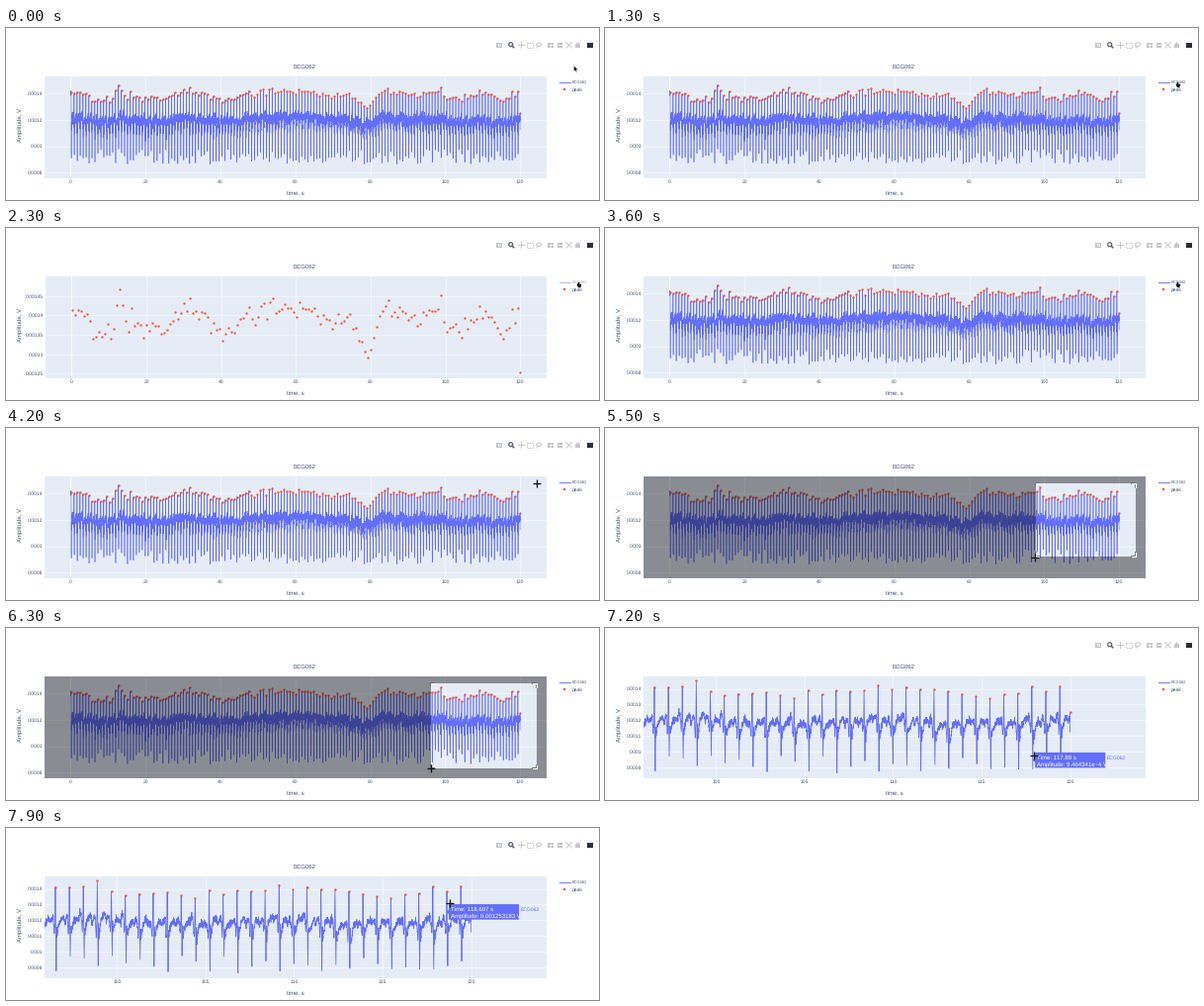
These frames come from a looping animation (600x174 px, 8000 ms). A matplotlib script:

```python
import numpy as np
import matplotlib.pyplot as plt
from matplotlib.animation import FuncAnimation
from matplotlib.patches import Circle, Ellipse, PathPatch, Polygon, Rectangle
from matplotlib.path import Path

W, H, DPI = 600, 174, 100
FPS, FRAMES = 10, 80
PT = 72 / DPI  # points per pixel
BLUE, RED, INK = "#636efa", "#ef553b", "#3f526f"
PAPER, GREY, DARK = "#e5ecf6", "#c4c6c9", "#5d6672"
TOP, BOTTOM, RIGHT = 49, 152, 547

plt.rcParams["font.family"] = "Liberation Sans"
plt.rcParams["text.hinting"] = "none"
plt.rcParams["text.hinting_factor"] = 1

# Moments of the session, in seconds
HIDE, SHOW, DRAG, RELEASE, HOVER = 1.7, 3.5, 4.5, 6.5, 6.7

# Views: left edge, x limits, y limits, x ticks, y ticks (microvolts), line width
FULL = (39, (-6.97, 127.1), (755, 1532), range(0, 121, 20), range(800, 1401, 200), 0.6)
PEAKS = (40, (-7.0, 127.1), (1238.4, 1500.5), range(0, 121, 20), range(1250, 1451, 50), 0.6)
ZOOM = (39, (95.9, 124.27), (831, 1479), range(100, 121, 5), range(900, 1401, 100), 0.8)

# Trend of the peak heights: time, microvolts
TREND = np.array([
    (0, 1430), (4, 1410), (6, 1365), (11, 1355), (12.8, 1475), (14.5, 1370),
    (25, 1365), (31, 1415), (44, 1350), (48, 1410), (64, 1430), (68, 1375),
    (75, 1385), (79, 1285), (83, 1420), (92, 1390), (96.5, 1415), (99, 1440),
    (100, 1355), (110, 1395), (115.5, 1340), (119.4, 1415),
])


def make_signal():
    """Return time and voltage of the trace, then time and height of the peaks."""
    rng = np.random.default_rng(62)
    step = 0.004
    beat = np.round(np.arange(0.13, 119.5, 0.79) / step) * step
    trend = np.interp(beat, *TREND.T)
    height = trend + rng.normal(0, 16, len(beat))

    # Offsets from the beat and the level there; the first is the spike downwards
    offset = np.array([0.05, 0.075, 0.1, 0.16, 0.25, 0.4, 0.5, 0.6, 0.68, 0.73, 0.766])
    level = np.array([0, 1165, 1100, 1150, 1190, 1215, 1185, 1218, 1205, 1110, 1190])
    smooth = np.convolve(np.pad(trend, 2, mode="edge"), np.ones(5) / 5, "valid")
    wander = 0.45 * (smooth - 1385) + rng.normal(0, 9, len(beat))
    body = level + wander[:, None] + rng.normal(0, 11, (len(beat), len(level)))
    body[:, 0] = rng.uniform(840, 960, len(beat))

    knots_t = np.concatenate([beat, (beat[:, None] + offset).ravel()])
    knots_v = np.concatenate([height, body.ravel()])
    order = np.argsort(knots_t)
    t = np.arange(0, 120 + step / 2, step)
    v = np.interp(t, knots_t[order], knots_v[order])

    noise = np.convolve(rng.normal(0, 12, len(t)), np.ones(4) / 2, "same")
    phase = (t - beat[0]) % 0.79
    v += np.where((phase > 0.08) & (phase < 0.76), noise, 0)
    v[-3:] = 1253, 1190, 1125
    return t, v, np.append(beat, 120), np.append(height, 1253)


fig = plt.figure(figsize=(W / DPI, H / DPI), dpi=DPI, facecolor="white")
plot = fig.add_axes([0, 0, 1, 1], facecolor=PAPER)
for spine in plot.spines.values():
    spine.set_visible(False)
plot.tick_params(length=0, pad=1.3, labelsize=5.1 * PT, labelcolor=INK)
plot.grid(color="white", lw=0.5 * PT)
plot.set_axisbelow(True)
plot.axvline(0, color="white", lw=0.9 * PT, zorder=1)

time, volt, peak_t, peak_v = make_signal()
trace, = plot.plot(time, volt, color=BLUE)
plot.plot(peak_t, peak_v, "o", color=RED, ms=2.3 * PT, mew=0)

# Overlay in pixels, origin at the top left
top = fig.add_axes([0, 0, 1, 1], zorder=5)
top.set(xlim=(0, W), ylim=(H, 0))
top.axis("off")


def label(x, y, text, size, color=INK, **kw):
    kw = {"ha": "left", "va": "center_baseline", **kw}
    return top.text(x, y, text, fontsize=size * PT, color=color, **kw)


def stroke(xs, ys, color=GREY, width=1.0, **kw):
    return top.plot(xs, ys, color=color, lw=width * PT, **kw)[0]


def fill(shape, color=GREY, **kw):
    shape.set(facecolor=color, edgecolor="none", **kw)
    return top.add_patch(shape)


def ring(shape, color=GREY, width=1.0):
    shape.set(facecolor="none", edgecolor=color, linewidth=width * PT)
    return top.add_patch(shape)


def make_modebar():
    y = 17.3
    parts = [
        fill(Rectangle((496.3, 15.4), 6, 4.4)),
        fill(Rectangle((498, 14.6), 2.6, 1)),
        fill(Circle((499.3, 17.6), 1.5), "white"),
        fill(Circle((499.3, 17.6), 0.8)),
        ring(Circle((510.7, 16.7), 2), DARK, 1.3),
        stroke([512.2, 513.8], [18.2, 19.8], DARK, 1.5),
        stroke([517.6, 523.6], [y, y]),
        stroke([520.6, 520.6], [y - 3, y + 3]),
        stroke([527.3, 532.7, 532.7, 527.3, 527.3],
               [14.7, 14.7, 20, 20, 14.7], width=0.9, ls=(0, (1.6, 0.8))),
        ring(Ellipse((539.2, 16.6), 5.6, 3.6, angle=-15), width=0.9),
        stroke([537.3, 537.8], [18, 20.2], width=0.9),
    ]
    for x in (551, 560.3):
        parts.append(fill(Rectangle((x - 2.8, y - 2.8), 5.6, 5.6)))
        parts.append(stroke([x - 1.7, x + 1.7], [y, y], "white", 0.7))
    parts += [
        stroke([551, 551], [y - 1.7, y + 1.7], "white", 0.7),
        stroke([566.8, 572.2], [14.6, 20]),
        stroke([566.8, 572.2], [20, 14.6]),
        fill(Polygon([(575.2, 17.4), (578.4, 14.4), (581.6, 17.4)])),
        fill(Rectangle((576.2, 17.2), 4.4, 2.8)),
        fill(Rectangle((588.2, 14.6), 5.6, 5.6), "#2b2f36"),
    ]
    return parts


modebar = make_modebar()

# Title, axis names, legend
label(302, 38.8, "ECG062", 6.4, ha="center")
x_name = label(292.5, 166.8, "time, s", 5.9, ha="center")
label(14.2, 98, "Amplitude, V", 6.2, rotation=90, ha="center", va="center")
legend = [stroke([559.5, 570.5], [54.7, 54.7], BLUE, 0.9),
          label(573, 54.9, "ECG062", 4.4)]
fill(Circle((565, 62), 1.2), RED)
label(573, 62.1, "peak", 4.8)

# Zoom rectangle: shade around it and four corner brackets
shade = top.add_patch(PathPatch(Path([(0, 0)]), facecolor="black", lw=0))
bracket_edge = stroke([], [], "#666666", 1.7)
bracket = stroke([], [], "white", 1.1)

# Hover label
bubble = fill(Polygon([(0, 0)]), BLUE)
hover_lines = [label(0, 0, "", 5.6, "white") for _ in range(2)]
hover_name = label(0, 0, "ECG062", 5.2, BLUE)
hover_parts = [bubble, hover_name, *hover_lines]

# Pointers
ARROW = np.array([(0, 0), (0, 6), (1.4, 4.8), (2.4, 6.8), (3.4, 6.3), (2.4, 4.3), (4.2, 4.2)])
HAND = np.array([(-0.6, 0), (0.5, 0), (0.7, 2.1), (2.6, 2.6), (1.8, 6.2), (-0.7, 6.2), (-2.4, 3.4)])
pointer = top.add_patch(Polygon(ARROW, facecolor="#151515", edgecolor="white",
                                lw=0.35 * PT, zorder=9))
cross, = top.plot([], [], "+", color="#151515", ms=7.5 * PT, mew=1.3 * PT, zorder=9)

# Pointer path: time, x, y
TRACK = np.array([
    (0, 574.5, 38), (0.6, 579.8, 54.3), (3.7, 579.8, 54.3), (4.1, 536.5, 56.3),
    (4.4, 536.5, 56.3), (4.8, 443, 115), (6.0, 429.5, 142), (6.5, 429.5, 142),
    (7.2, 434.3, 129), (7.9, 448.5, 75.5),
])


def pointer_at(s):
    return np.array([np.interp(s, TRACK[:, 0], TRACK[:, k]) for k in (1, 2)])


def set_view(view):
    left, xlim, ylim, xticks, yticks, width = view
    plot.set_position([left / W, 1 - BOTTOM / H, (RIGHT - left) / W, (BOTTOM - TOP) / H])
    plot.set_xticks(list(xticks))
    plot.set_yticks(list(yticks), [f"{v * 1e-6:g}" for v in yticks])
    plot.set(xlim=xlim, ylim=ylim)
    trace.set_linewidth(width * PT)
    x_name.set_x(292.5 + (left - 39) * 0.5)


def loop(x0, y0, x1, y1):
    return [(x0, y0), (x1, y0), (x1, y1), (x0, y1), (x0, y0)]


def draw_zoom_box(s):
    active = DRAG <= s < RELEASE
    for part in (shade, bracket, bracket_edge):
        part.set_visible(active)
    if not active:
        return
    x1, y0 = 536.5, 56.3
    x0, y1 = pointer_at(s - 0.05)  # the box trails the pointer
    codes = [Path.MOVETO] + [Path.LINETO] * 3 + [Path.CLOSEPOLY]
    outer = loop(39, TOP, RIGHT, BOTTOM)
    shade.set_path(Path(outer + loop(x0, y0, x1, y1)[::-1], codes * 2))
    shade.set_alpha(min(0.4, 0.2 + (s - DRAG) * 2))
    arm = min(3.5, (x1 - x0) / 2, (y1 - y0) / 2)
    xs, ys = [], []
    for x, dx in ((x0, arm), (x1, -arm)):
        for y, dy in ((y0, arm), (y1, -arm)):
            xs += [x + dx, x, x, np.nan]
            ys += [y, y, y + dy, np.nan]
    bracket.set_data(xs, ys)
    bracket_edge.set_data(xs, ys)


def draw_hover(s):
    for part in hover_parts:
        part.set_visible(s >= HOVER)
    if s < HOVER:
        return
    t, v = (np.interp(s, (7.2, 7.9), ends)
            for ends in ((117.89, 118.607), (946.4337, 1253.183)))
    left, (t0, t1), (v0, v1) = ZOOM[:3]
    x = left + (t - t0) / (t1 - t0) * (RIGHT - left)
    y = BOTTOM - (v - v0) / (v1 - v0) * (BOTTOM - TOP)
    a, b = x + 2.4, x + 73.5
    bubble.set_xy([(x, y), (a, y - 2.4), (a, y - 7.8), (b, y - 7.8),
                   (b, y + 7.8), (a, y + 7.8), (a, y + 2.4)])
    amount = f"{v / 100:.6f}e\u22124" if v < 1000 else f"{v * 1e-6:.9f}"
    texts = f"Time: {round(t, 3)} s", f"Amplitude: {amount} V"
    for line, text, dy in zip(hover_lines, texts, (-2.9, 3.5)):
        line.set_text(text)
        line.set_position((x + 4.2, y + dy))
    hover_name.set_position((b + 1.8, y - 3))


def draw_pointer(s):
    pos = pointer_at(s)
    in_plot = pos[0] < RIGHT
    pointer.set_visible(not in_plot)
    cross.set_visible(in_plot)
    pointer.set_xy((HAND if pos[1] > 50 else ARROW) + pos)
    cross.set_data(pos[:1], pos[1:])


def draw(i):
    s = i / FPS + 1e-6
    hidden = HIDE <= s < SHOW
    set_view(ZOOM if s >= RELEASE else PEAKS if hidden else FULL)
    trace.set_visible(not hidden)
    for part in legend:
        part.set_alpha(0.5 if hidden else 1)
    for part in modebar:
        part.set_visible(not DRAG <= s < RELEASE)
    draw_zoom_box(s)
    draw_hover(s)
    draw_pointer(s)
    return []


anim = FuncAnimation(fig, draw, frames=FRAMES, interval=1000 / FPS,
                     init_func=lambda: [], repeat=True)
plt.show()
```
